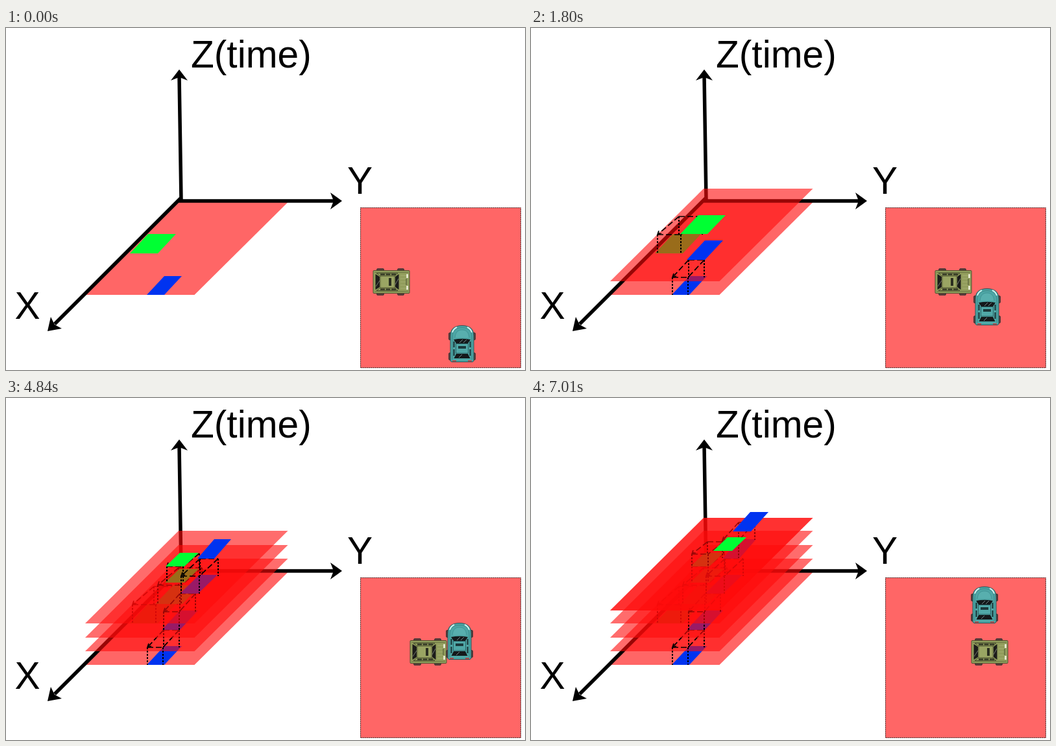
Animation, 800 px wide and 528 px high, one loop 8000 ms. Source, as an HTML page:

```html
<!DOCTYPE html>
<html lang="en">
<head>
<meta charset="utf-8">
<title>Space-time stack</title>
<style>
html, body { margin: 0; width: 100%; height: 100%; overflow: hidden; background: #fff; }
svg { display: block; width: 100vw; height: 100vh; }
text { font: 58.67px "Liberation Sans", Arial, sans-serif; }
</style>
</head>
<body>
<svg viewBox="0 0 800 528">
  <rect width="800" height="528" fill="#fff"/>
  <g id="ground"></g>
  <g stroke="#000" stroke-width="5.5" fill="none">
    <path d="M267 74L270 266M264 267H505M271 261L75 457"/>
    <path stroke="none" fill="#000" d="M267 64L280 81L267 76L254 81ZM518 267L500 280L505 267L500 254ZM64 468L69 446L75 458L86 464Z"/>
  </g>
  <g id="stack"></g>
  <text x="285" y="61">Z(time)</text>
  <text x="526" y="256">Y</text>
  <text x="13.5" y="449">X</text>

  <rect x="546.5" y="277.5" width="247" height="247" fill="#f66" stroke="#401818" stroke-dasharray="2 1"/>

  <g id="jeep">
    <g fill="#5a3a38" stroke="#333" stroke-width=".8">
      <rect x="571.5" y="371.5" width="11" height="41" rx="1.5"/>
      <rect x="603.5" y="371.5" width="10" height="41" rx="1.5"/>
    </g>
    <rect x="566" y="374.5" width="56" height="35" rx="1" fill="#929d5c" stroke="#4b5230"/>
    <path d="M568 377.5H620M568 406.5H620" stroke="#606b3c" stroke-width=".8"/>
    <path d="M608 382H617M608 387H617M608 392H617M608 397H617M608 402H617" stroke="#a9b376" stroke-width=".8"/>
    <path d="M569.500 380L576 384V400L569.500 404ZM605.500 380L600 384V400L605.500 404Z" fill="#1c1c1a"/>
    <path d="M571 378.500H604L599 383H577ZM571 405.500H604L599 401H577Z" fill="#929d5c" stroke="#3c4228" stroke-width=".8"/>
    <path d="M577 380.500H601M577 403.500H601" stroke="#22251a" stroke-width="2" stroke-dasharray="7 1.500"/>
    <rect x="577" y="383" width="22" height="18" fill="#9aa563" stroke="#4b5230" stroke-width=".8"/>
    <rect x="590" y="386" width="4" height="12" fill="#2b2e20"/>
    <path d="M570 399L576 390M600 396L605 387" stroke="#747a70"/>
    <path d="M618.500 380V386M618.500 398V404" stroke="#eef0dc" stroke-width="2.500"/>
    <path d="M617 387V397" stroke="#4b5230"/>
  </g>

  <g id="coupe">
    <g fill="#5a3a38" stroke="#333" stroke-width=".8">
      <rect x="682.5" y="470.5" width="41" height="11" rx="1.5"/>
      <rect x="682.5" y="501.5" width="41" height="11" rx="1.5"/>
    </g>
    <path d="M685 514V475C685 464 692 459.500 703 459.500S721 464 721 475V514L719 515.500H687Z" fill="#4ea6a5" stroke="#245458"/>
    <path d="M688 512V477C688 467 694 462.500 703 462.500S718 467 718 477V512" fill="none" stroke="#337f82" stroke-width=".8"/>
    <path d="M692 478C693 469 697 466 703 466S713 469 714 478" fill="#58afae" stroke="#3d8f91" stroke-width=".8"/>
    <path d="M688 470Q690 464 695 462M718 470Q716 464 711 462" fill="none" stroke="#c9efeb" stroke-width="2"/>
    <path d="M690 481Q703 478.500 716 481L712 487H694ZM690.500 510L694 503H712L715.500 510Z" fill="#14191b"/>
    <path d="M690.500 484V493M690.500 496V506M715.500 484V493M715.500 496V506" stroke="#183134" stroke-width="2"/>
    <rect x="693.500" y="487.500" width="19" height="14.500" fill="#50a8a7" stroke="#245458" stroke-width=".8"/>
    <rect x="697" y="491" width="12" height="4" fill="#1c393c"/>
    <path d="M699 486L704 481M705 486L710 481M698 509L703 504" stroke="#748889"/>
    <path d="M688 514H694M712 514H718" stroke="#c33" stroke-width="1.500"/>
  </g>
</svg>
<script>
const LOOP = 8000, STEPS = [500, 2670, 4840, 7010];
const GREEN = '#00ff33', BLUE = '#0033f0', SHEET = 'rgba(255,10,10,.6)';
const $ = id => document.getElementById(id);

// Boxes: top-left x, top y, top width, slant, height.
// Links: left x, right x, front y, depth dx, depth dy, drop.
const layers = [
  { y: 269, green: [219, 318, 43, 28, 30], blue: [244, 383, 27, 27, 29], links: [] },
  { y: 248, green: [258, 289, 42, 28, 29], blue: [268, 328, 28, 28, 30],
    links: [[195, 231, 319, 33, 28, 28], [218, 242, 385, 25, 27, 27]] },
  { y: 227, green: [267, 264, 30, 22, 21], blue: [298, 273, 28, 30, 29],
    links: [[234, 270, 289, 32, 27, 28], [243, 267, 330, 25, 28, 28]] },
  { y: 205, green: [268, 239, 29, 22, 21], blue: [321, 218, 26, 26, 30],
    links: [[248, 273, 260, 25, 20, 24], [270, 298, 275, 29, 27, 27]] },
  { y: 185, green: [303, 215, 29, 22, 21], blue: [338, 176, 28, 27, 30], double: true,
    links: [[248, 273, 241, 24, 19, 19], [295, 320, 220, 25, 28, 27]] }
];
const jeepAt = [[0, 0], [57, 0], [57, -1], [57, 0], [113, 0]];
const coupeAt = [[0, 0], [0, -57], [0, -96], [-4, -112], [-4, -168]];

const skew = ([x, y, w, s, h], fill) =>
  `<path fill="${fill}" d="M${x} ${y}h${w}l${-s} ${h}h${-w}z"/>`;

const sheet = (y, fill) => skew([266, y, 168.5, 144, 143], fill);

function link([a, b, y, dx, dy, drop]) {
  const back = y - dy;
  const edges = `M${a} ${y}H${b}M${a + dx} ${back}H${b + dx}` +
    `M${a + dx} ${back}L${a} ${y}M${b + dx} ${back}L${b} ${y}`;
  const posts = `M${a} ${y}v${drop}M${b} ${y}v${drop}` +
    `M${a + dx} ${back}v${drop}M${b + dx} ${back}v${drop}`;
  return `<g fill="none" stroke="#000" stroke-width="1.7">` +
    `<path stroke-dasharray="9 4" d="${edges}"/>` +
    `<path stroke-width="2" stroke-dasharray="3 2" d="${posts}"/>` +
    `<path d="M${a + 2} ${y - 6}L${a} ${y}l6 -2"/></g>`;
}

// A double layer has a second sheet above its links.
function layer({ y, green, blue, links, double }, i) {
  return sheet(y, i ? SHEET : '#f66') + links.map(link).join('') +
    (double ? sheet(y, SHEET) : '') + skew(green, GREEN) + skew(blue, BLUE);
}

const parts = layers.map(layer);
$('ground').innerHTML = parts[0];

const move = (id, [x, y]) => $(id).setAttribute('transform', `translate(${x} ${y})`);

let shown = -1;
function draw(t) {
  const step = STEPS.filter(s => t >= s).length;
  if (step === shown) return;
  shown = step;
  $('stack').innerHTML = parts.slice(1, step + 1).join('');
  move('jeep', jeepAt[step]);
  move('coupe', coupeAt[step]);
}

const start = performance.now();
function tick() {
  draw((performance.now() - start) % LOOP);
  requestAnimationFrame(tick);
}
tick();
</script>
</body>
</html>
```
